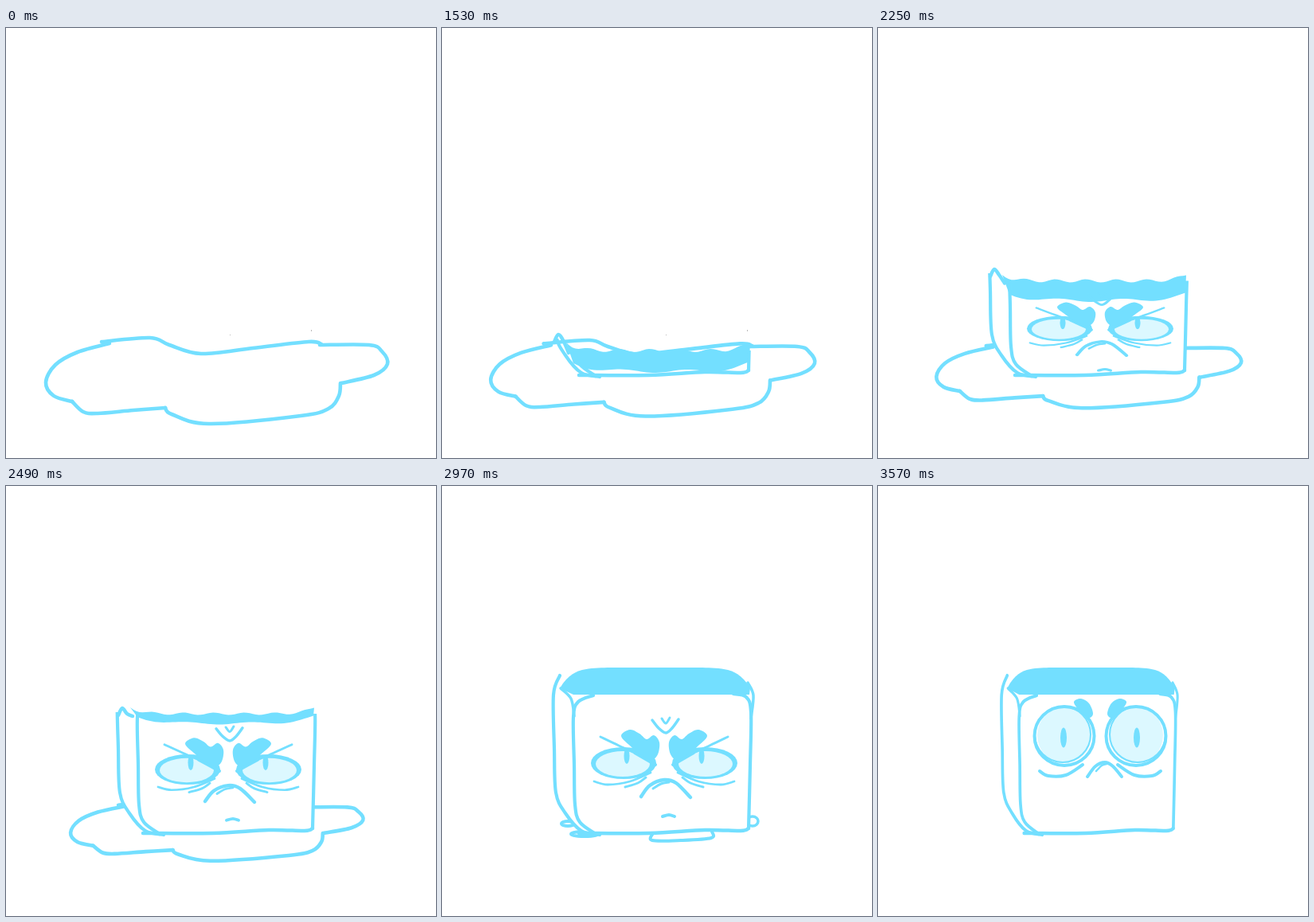
Write an HTML page with a canvas that moves like this. It is 540x540 px and loops after 3840 ms.

```html
<!DOCTYPE html>
<html lang="en">
<head>
<meta charset="utf-8">
<title>Ice cube</title>
<style>
html, body { margin: 0; width: 100%; height: 100%; overflow: hidden; background: #fff; }
canvas { display: block; width: 100vw; height: 100vh; }
</style>
</head>
<body>
<canvas id="c" width="540" height="540"></canvas>
<script>
const ctx = document.getElementById('c').getContext('2d');
const BLUE = '#73dfff', PALE = '#dcf8ff', LOOP = 3840, FLOOR = 436, AXIS = 279;

// How far the cube has risen, how its top is bent, and how far the puddle has shrunk
const KEYS = [
  { t: 1050, top: 434, depth: 2, lift: 0, bend: 0, wave: 0, shrink: .07, faceY: 480, faceK: .5 },
  { t: 1530, top: 405, depth: 26, lift: 20, bend: -10, wave: 2, shrink: .36, faceY: 480, faceK: .5 },
  { t: 2010, top: 349, depth: 37, lift: 22, bend: -7, wave: 2.5, shrink: .5, faceY: 400, faceK: .62 },
  { t: 2490, top: 286, depth: 12, lift: 7, bend: -8, wave: 1.5, shrink: 1, faceY: 358, faceK: .95 },
  { t: 2760, top: 228, depth: 34, lift: 0, bend: 26, wave: 0, shrink: 1.6, faceY: 350, faceK: 1 }
];

const PUDDLE = [
  [120,394, 181,389, 205,398, 245,409, 310,402, 380,394, 396,397],
  [394,398, 456,398, 472,406, 479,422, 462,436, 421,446],
  [420,446, 418,462, 405,478, 370,487, 255,497, 208,485, 200,477],
  [200,477, 160,480, 115,484, 97,482, 83,469],
  [83,469, 60,462, 50,445, 62,423, 90,407, 130,396]
];
const LEFT = [148,238, 140,262, 141,330, 143,385, 155,411, 175,433, 198,438];
const INNER = [190,263, 171,271, 165,290, 166,350, 167,400, 173,422, 193,437];
const RIGHT = [366,261, 382,265, 388,284, 387,350, 385,430];
const BASE = [172,436, 260,436, 330,432, 375,433, 385,430];

function poseAt(t) {
  const i = KEYS.findIndex(k => k.t > t);
  if (i < 0) return KEYS[KEYS.length - 1];
  const a = KEYS[i - 1], b = KEYS[i], p = (t - a.t) / (b.t - a.t), pose = {};
  for (const k in a) pose[k] = a[k] + (b[k] - a[k]) * p;
  return pose;
}

// The drawing is held on coarse steps, quicker at the end
function hold(t) {
  const snap = (from, step) => from + step * Math.floor((t - from) / step);
  if (t < 1050) return 0;
  return t < 3210 ? snap(1050, 120) : Math.min(3570, snap(3210, 90));
}

// Smooth path through flat x,y pairs
function curve(pts, closed) {
  const n = pts.length / 2, path = new Path2D();
  const at = i => {
    const j = closed ? (i + n) % n : Math.max(0, Math.min(n - 1, i));
    return [pts[2 * j], pts[2 * j + 1]];
  };
  path.moveTo(...at(0));
  for (let i = 0; i < (closed ? n : n - 1); i++) {
    const [p, a, b, q] = [at(i - 1), at(i), at(i + 1), at(i + 2)];
    path.bezierCurveTo(a[0] + (b[0] - p[0]) / 6, a[1] + (b[1] - p[1]) / 6,
      b[0] - (q[0] - a[0]) / 6, b[1] - (q[1] - a[1]) / 6, b[0], b[1]);
  }
  return path;
}

function line(w, ...pts) {
  ctx.lineWidth = w;
  ctx.stroke(curve(pts));
}

function blob(...pts) {
  ctx.fillStyle = BLUE;
  ctx.fill(curve(pts, true));
}

function poly(color, pts) {
  ctx.fillStyle = color;
  ctx.beginPath();
  for (let i = 0; i < pts.length; i += 2) ctx.lineTo(pts[i], pts[i + 1]);
  ctx.fill();
}

function oval(x, y, rx, ry, color) {
  ctx.fillStyle = color;
  ctx.beginPath();
  ctx.ellipse(x, y, rx, ry, 0, 0, 7);
  ctx.fill();
}

function ring(x, y, rx, ry, w) {
  ctx.lineWidth = w;
  ctx.beginPath();
  ctx.ellipse(x, y, rx, ry, 0, 0, 7);
  ctx.stroke();
}

function scaled(x, y, sx, sy, fn) {
  ctx.save();
  ctx.translate(x, y);
  ctx.scale(sx, sy);
  ctx.translate(-x, -y);
  fn();
  ctx.restore();
}

function between(y0, y1, fn) {
  ctx.save();
  ctx.beginPath();
  ctx.rect(0, y0, 540, y1 - y0);
  ctx.clip();
  fn();
  ctx.restore();
}

function bothSides(fn) {
  fn();
  scaled(AXIS, 0, -1, 1, fn);
}

function puddle(p) {
  for (const pts of PUDDLE) {
    line(4.6, ...pts.map((n, i) => i % 2
      ? 443 - 9 * p + (n - 443) * (1 - .32 * p)
      : 266 + (n - 266) * (1 - .144 * p)));
  }
}

function drips() {
  ring(158, 424, 8, 3, 4);
  ring(179, 437, 17, 3, 4);
  ring(390, 421, 7, 6, 3.5);
  line(4, 265,436, 264,445, 300,445, 338,442, 339,434);
}

function slab({ top, depth, bend, wave }, x0) {
  const pts = [], n = 60;
  for (let i = 0; i <= n; i++) {
    const u = i / n, s = Math.abs(2 * u - 1);
    pts.push(x0 + (387 - x0) * u, top + bend * s ** 8 + wave * Math.sin(u * 38));
  }
  for (let i = n; i >= 0; i--) {
    const u = i / n, s = Math.abs(2 * u - 1);
    pts.push(165 + 221 * u, Math.min(434, top + depth + Math.min(0, bend) * s ** 4 + wave * Math.sin(u * 17)));
  }
  poly(BLUE, pts);
}

function glare() {
  bothSides(() => {
    oval(228, 348, 41, 20, BLUE);
    oval(227, 349, 34, 16, PALE);
    oval(232, 339, 3.5, 10, BLUE);
    blob(225,314, 236,306, 248,311, 257,318, 266,313, 273,322, 271,337, 263,344, 250,339, 238,328);
    line(3, 199,315, 222,326, 242,335);
    line(4, 242,335, 268,350);
    line(2.8, 191,371, 208,375, 236,371, 262,360);
    line(3, 230,378, 246,373, 256,366);
  });
  line(4.5, 250,390, 261,376, 279,369, 294,373, 312,391);
  line(3, 265,380, 275,374, 285,372);
  line(4, 277,415, 285,413, 292,415);
  line(3.5, 264,294, 272,304, 281,310, 289,304, 297,293);
  line(3, 276,292, 281,298, 286,291);
}

function stare() {
  bothSides(() => {
    oval(234, 313, 34, 35, PALE);
    ring(234, 314, 37.5, 37, 4);
    ring(232, 312, 35, 35, 2);
    oval(233, 316, 4, 12.5, BLUE);
    blob(246,271, 255,267, 265,273, 270,286, 264,291, 252,281);
    line(4, 203,358, 214,364, 236,363, 257,350);
  });
  line(4, 263,365, 273,352, 285,347, 295,352, 306,365);
  line(2.5, 274,358, 281,351, 287,349);
}

function shell(pose, solid) {
  const { top, lift } = pose;
  if (top < 390) between(top + 4, 540, () => poly('#fff', [...LEFT, 384,431, 388,280, 384,250]));
  slab(pose, solid ? 148 : 156);
  between(top - lift + 5, 540, () => line(4.2, ...LEFT));
  between(top, 540, () => {
    line(4.2, ...INNER);
    line(4.2, ...RIGHT);
    line(4.5, ...BASE);
  });
  if (solid) {
    line(3.5, 149,254, 162,267, 166,289);
    line(3.5, 384,247, 391,263, 388,292);
  } else {
    const tip = top - lift;
    line(4.5, 141,tip + 9, 146,tip, 152,tip + 7, 159,top + 3);
  }
}

function cube(t, pose) {
  const awake = t >= 3480;
  // Squash, then stretch, then settle a little slimmer
  const sx = awake ? .88 : t === 3390 ? 1.05 : 1;
  const sy = t === 3390 ? .93 : t === 3480 ? 1.08 : 1;
  scaled(267, FLOOR, sx, sy, () => shell(pose, t >= 2850));
  scaled(267, FLOOR, awake ? 1 : sx, sy, () => {
    if (awake) return stare();
    between(pose.top, FLOOR, () => {
      ctx.translate(0, pose.faceY - 350 * pose.faceK);
      ctx.scale(1, pose.faceK);
      glare();
    });
  });
}

function draw(now) {
  const t = hold(now % LOOP), pose = t ? poseAt(t) : { shrink: 0 };
  ctx.fillStyle = '#fff';
  ctx.fillRect(0, 0, 540, 540);
  ctx.strokeStyle = BLUE;
  ctx.lineCap = ctx.lineJoin = 'round';

  if (t < 1650) {
    ctx.fillStyle = '#bbb';
    ctx.fillRect(281, 385, 1, 1);
    ctx.fillRect(383, 379, 1, 2);
  }
  if (t < 2850) puddle(pose.shrink);
  else if (t < 3210) drips();

  if (t === 1050) {
    ring(163, 436, 5.5, 2.8, 3.5);
    line(4, 377,435, 382,434, 386,432);
  } else if (t > 1050) cube(t, pose);
}

const start = performance.now();
function tick() {
  draw(performance.now() - start);
  requestAnimationFrame(tick);
}
tick();
</script>
</body>
</html>
```
